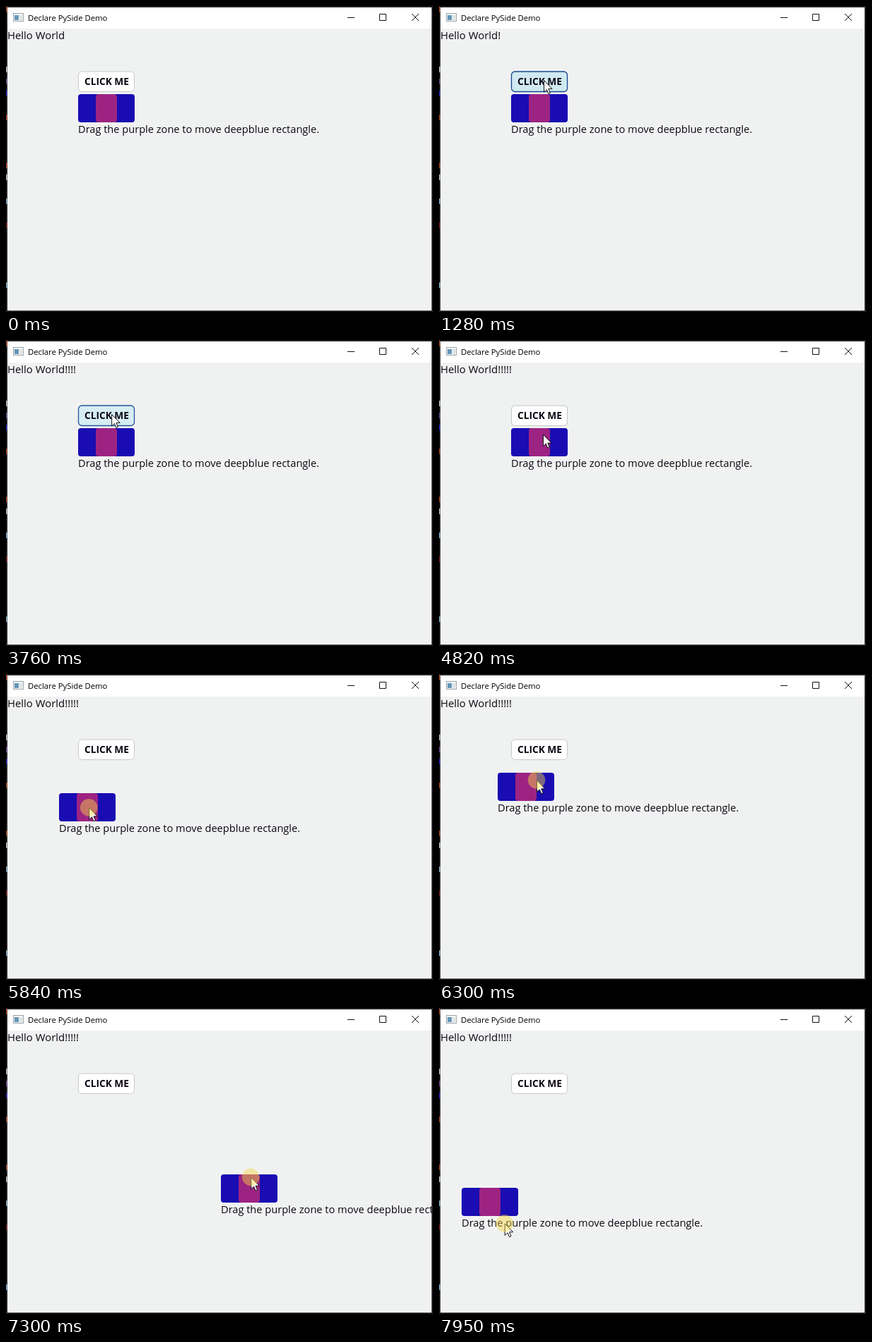
Recreate the animation shown at these times as an HTML page. Size 604 by 434 pixels, loop 8000 ms.

```html
<!DOCTYPE html>
<html lang="en">
<head>
<meta charset="utf-8">
<title>Declare PySide Demo</title>
<style>
  html, body { margin: 0; width: 100%; height: 100%; overflow: hidden; background: #242326; }
  svg { display: block; width: 604px; height: 434px; }
  text { font: 14.6px "Open Sans", "Noto Sans", sans-serif; fill: #0c0612; white-space: pre; }
  .title { font-size: 11.3px; fill: #000; }
  .greeting { font-size: 14.9px; }
  .label { font-size: 13.7px; font-weight: 700; }
  .glyph { fill: none; stroke: #111; }
</style>
</head>
<body>
<svg viewBox="0 0 604 434">
  <defs>
    <clipPath id="client"><rect x="2" y="32" width="600" height="400"/></clipPath>
  </defs>
  <rect width="604" height="434" fill="#242326"/>
  <g id="behind"></g>
  <rect x="2" y="2" width="600" height="30" fill="#fff"/>
  <rect x="2" y="32" width="600" height="400" fill="#f0f2f1"/>

  <!-- title bar -->
  <rect x="10.5" y="10.5" width="14" height="11" fill="#f4f6f8" stroke="#9aa3a9"/>
  <rect x="12" y="13" width="6" height="7" fill="#6496b8"/>
  <rect x="19" y="13" width="4" height="7" fill="#dde3e2"/>
  <text class="title" x="31" y="21">Declare PySide Demo</text>
  <path class="glyph" d="M483 16.5h10M528.5 11.5h9v9h-9zM574 11l10 10M584 11l-10 10"/>

  <g clip-path="url(#client)">
    <text id="greeting" class="greeting" x="2" y="47"></text>
    <rect id="button" x="102.5" y="93" width="79" height="28.5" rx="5"/>
    <text class="label" x="111" y="112">CLICK ME</text>
    <g id="block">
      <rect width="80" height="40" rx="4" fill="#190cb2"/>
      <rect x="25" width="30" height="40" rx="4" fill="#9d2382"/>
      <text y="55">Drag the purple zone to move deepblue rectangle.</text>
    </g>
  </g>

  <g id="pointer">
    <path d="M.5 .5V17L4.3 13.4 6.8 19.3 9.3 18.3 6.8 12.4H12Z" fill="#fff" stroke="#111"/>
    <circle id="halo" r="12.3" fill="rgb(246,214,70)" fill-opacity=".46"/>
  </g>
</svg>
<script>
const LOOP = 8000, ENTER = 170, GRAB = 4850, LAG = 50, FADE = 130;
const $ = id => document.getElementById(id);

// Turning points of the hand, [time, position]; it eases from one to the next
const sweepX = [
  [ENTER, 430], [1050, 148], [1840, 148], [2030, 156], [3060, 156], [3140, 150],
  [GRAB, 147], [5400, 169], [5860, 117], [6000, 104], [6870, 231],
  [7260, 349], [7900, 77], [8060, 145]
];
const sweepY = [
  [ENTER, 440], [1050, 105], [4400, 105], [GRAB, 134], [5450, 195], [5640, 149],
  [5900, 195], [6250, 149], [6640, 182], [6900, 301], [7350, 238],
  [7480, 186], [7780, 192], [8010, 326]
];
const releases = [1220, 2200, 2650, 3650, 4200], HOLD = 100;

const ramp = (t, start, length) => Math.max(0, Math.min(1, (t - start) / length));
const mix = (a, b, k) => a.map((v, i) => v + (b[i] - v) * k);
const rgb = c => `rgb(${c.map(Math.round)})`;

function along(sweep, t) {
  const next = Math.max(1, sweep.findIndex(([time]) => time > t));
  const [t0, from] = sweep[next - 1], [t1, to] = sweep[next];
  return from + (to - from) * (1 - Math.cos(Math.PI * ramp(t, t0, t1 - t0))) / 2;
}

function show(id, visible) {
  $(id).style.display = visible ? "" : "none";
}

function render(t) {
  const move = (id, x, y) => $(id).setAttribute("transform", `translate(${x} ${y})`);
  move("pointer", along(sweepX, t), along(sweepY, t));
  show("pointer", t >= ENTER);

  // The block trails the pointer, keeping the spot where it was grabbed
  const late = Math.max(t - LAG, GRAB);
  move("block", Math.round(along(sweepX, late) - 45), Math.round(along(sweepY, late) - 9));

  const held = releases.some(up => t >= up - HOLD && t < up);
  show("halo", held || t > GRAB + LAG);
  const count = releases.filter(up => t >= up + 30).length;
  $("greeting").textContent = "Hello World" + "!".repeat(count);

  const hover = ramp(t, 1000, FADE) - ramp(t, 4695, FADE);
  const press = Math.max(...releases.map(up => ramp(t, up - HOLD, 60) - ramp(t, up, FADE)));
  const fill = mix([255, 255, 255], mix([216, 238, 243], [200, 230, 238], press), hover);
  const edge = mix([200, 200, 200], mix([40, 90, 155], [8, 50, 140], press), hover);
  $("button").setAttribute("fill", rgb(fill));
  $("button").setAttribute("stroke", rgb(edge));
  $("button").setAttribute("stroke-width", 1 + 0.3 * hover);
}

// Editor lines peeking out past the left edge, one letter per line
const ink = { o: "#b5562c", w: "#ccc", p: "#7a5a9a", b: "#3a3ad0", c: "#8fbcd6", r: "#8a2f2f" };
$("behind").innerHTML = [..."o----wpb-o---ow-c-r----c"].map((key, line) =>
  ink[key] ? `<rect y="${1 + 17 * line}" width="1.5" height="8" fill="${ink[key]}"/>` : "").join("");

function tick() {
  render(performance.now() % LOOP);
  requestAnimationFrame(tick);
}
tick();
</script>
</body>
</html>
```
